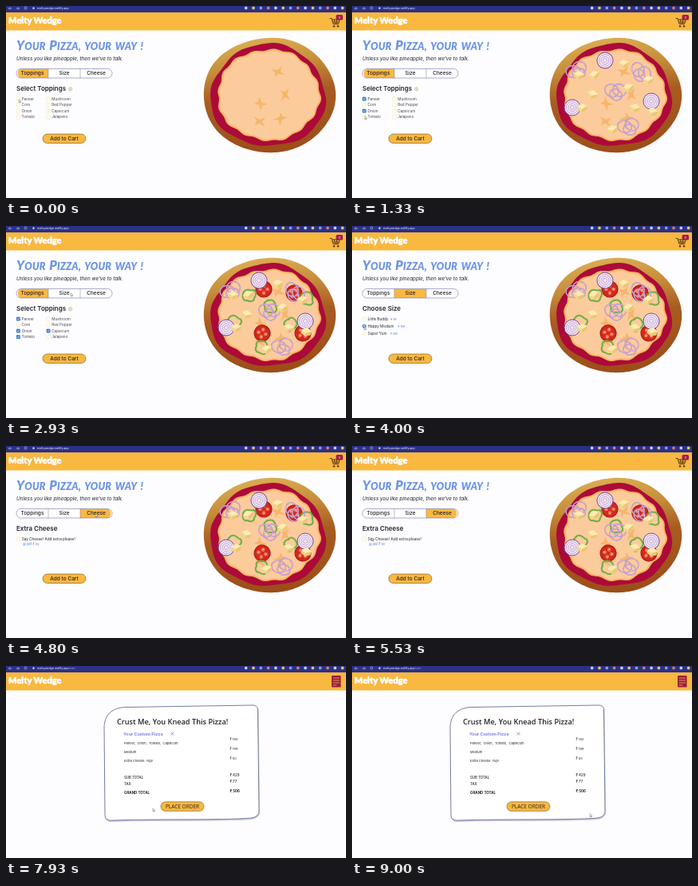
Animation, 426 px wide and 240 px high, one loop 9.07 s. Source, as an HTML page:

```html
<!DOCTYPE html>
<html lang="en">
<head>
<meta charset="utf-8">
<title>Pizza builder</title>
<style>
  html, body { margin: 0; width: 100%; height: 100%; overflow: hidden; background: #fdfdff; }
  svg { display: block; width: 100%; height: 100%; }
  text { font-family: Inter, "Open Sans", sans-serif; fill: #25232b; white-space: pre; }
  .brand { font: 900 11px Lato, sans-serif; fill: #fff; stroke: #fff; stroke-width: .5; stroke-linejoin: round; }
  .hero { font: italic 900 12.5px Lato, sans-serif; fill: #6c94e8; word-spacing: 2px; letter-spacing: .15px; }
  .hero .cap { font-size: 16px; }
  .open { font-family: "Open Sans", "Noto Sans", sans-serif; }
</style>
</head>
<body>
<svg id="stage" viewBox="0 0 426 240" preserveAspectRatio="none"></svg>
<script>
const LOOP = 9070;
const GOLD = '#f9b840', INK = '#34303c', BLUE = '#2f7de0', LILAC = '#a678c4', RIM = '#7478ab';

const text = (x, y, size, str, { w = 400, fill = '#25232b', more = '' } = {}) =>
  `<text x="${x}" y="${y}" font-size="${size}" font-weight="${w}" style="fill:${fill}" ${more}>${str}</text>`;
const path = (d, fill, stroke = 'none', w = 1) =>
  `<path d="${d}" fill="${fill}" stroke="${stroke}" stroke-width="${w}" stroke-linejoin="round" stroke-linecap="round"/>`;
const circle = (x, y, r, fill, stroke = 'none', w = 1) =>
  `<circle cx="${x}" cy="${y}" r="${r}" fill="${fill}" stroke="${stroke}" stroke-width="${w}"/>`;
const rect = (x, y, w, h, fill, more = '') =>
  `<rect x="${x}" y="${y}" width="${w}" height="${h}" fill="${fill}" ${more}/>`;
const group = (id, body) => `<g id="${id}">${body}</g>`;
const place = (spots, draw) => spots.map(([x, y, a = 0]) =>
  `<g transform="translate(${x} ${y}) rotate(${a})">${draw}</g>`).join('');

// Closed outline: an ellipse whose radius is modulated by f(angle).
function blob(cx, cy, rx, ry, f) {
  const pts = [];
  for (let i = 0; i < 180; i++) {
    const a = i * Math.PI / 90, k = 1 + f(a);
    pts.push((cx + rx * k * Math.cos(a)).toFixed(1) + ' ' + (cy + ry * k * Math.sin(a)).toFixed(1));
  }
  return 'M' + pts.join('L') + 'Z';
}

function browserBar() {
  let s = rect(0, 0, 426, 8, '#2b3186');
  s += path('M7 3H3.5l1.4-1.4M3.5 3l1.4 1.4M13 3h3.5l-1.4-1.4M16.5 3l-1.4 1.4', 'none', '#d5d8f5', .6);
  s += circle(24.5, 2.5, 1.5, 'none', '#d5d8f5', .6) + rect(33.5, 1.5, 2, 2.4, '#d5d8f5');
  for (let i = 0; i < 14; i++) {
    const tint = ['#c9cdf0', '#e27a62', '#8f9ae0', '#e7c565'][i * 7 % 4];
    s += rect(299 + i * 9.3, .7, 3.4, 3.6, tint, 'rx="1"');
  }
  return s + text(39, 3.9, 3.6, 'meltywedge.netlify.app<tspan id="route" fill="#9ea5df">/cart</tspan>', { fill: '#eef' });
}

function header() {
  const basket = path('M406 15.5h2l2 7h6.5l1.7-5.5h-9.4M410 20h7M411.5 17l1 5M414.5 17v5', 'none', '#5a3617', 1)
    + circle(411, 25.3, 1.2, '#5a3617') + circle(416, 25.3, 1.2, '#5a3617')
    + rect(413.5, 11, 8.5, 6.5, '#a31c48', 'rx="1.5"') + text(417.8, 15.7, 4, '0', { fill: '#fff', more: 'text-anchor="middle"' });
  const bill = rect(408, 12, 11.5, 14.5, '#981d3e', 'rx="1"')
    + path('M410 15h7.5M410 18h7.5M410 21h7.5M410 24h4', 'none', '#f0ad52', .8);
  return rect(0, 8, 426, 22.5, GOLD) + '<text class="brand" x="3" y="22">Melty Wedge</text>'
    + group('basket', basket) + group('bill', bill);
}

function pizza() {
  const crust = blob(330, 111.5, 83, 72, a => .006 * Math.cos(5 * a) - .006 * Math.cos(2 * a + .6) ** 2);
  const sauce = blob(328.5, 112, 72, 64, a => .025 * Math.sin(3 * a - .2) + .014 * Math.sin(8 * a));
  const cheese = blob(329, 111, 63, 56, a => .018 * Math.sin(16 * a) + .018 * Math.sin(5 * a + 1));
  const flakes = place([[341, 82], [319, 122, 60], [350, 111, 100], [318, 144, 20], [344, 141, 150]],
    path('M-9-3L-1-2 5-7 3 0 9 4 0 3-4 7-4 1Z', '#f5b66c'));

  const ring = (x, y, rx, ry) => [[LILAC, 1.5], ['#f0dcea', .6]].map(([c, w]) =>
    `<ellipse cx="${x}" cy="${y}" rx="${rx}" ry="${ry}" fill="none" stroke="${c}" stroke-width="${w}"/>`).join('');
  const rings = ring(-4, 2, 9, 7.5) + ring(4, -3, 8.5, 7.5) + ring(3, 4, 8, 6.5);
  const disc = circle(0, 0, 10, '#f3e7f5', '#7a4796', 1) + [7.5, 5, 2.5].map(r => circle(0, 0, r, 'none', '#b99aca', .8)).join('');
  const cube = path('M-6-1L0-5 7-2 6 3 0 6-6 3Z', '#f3d68c') + path('M-6-1L0-5 7-2 0 2Z', '#fcebb4')
    + path('M0 2L7-2 6 3 0 6Z', '#eac678');
  const seeds = [0, 90, 180, 270].map(a =>
    `<ellipse cx="4.5" rx="2.5" ry="2.3" fill="#f0704c" transform="rotate(${a})"/>` +
    `<circle cx="5" r=".8" fill="#fad391" transform="rotate(${a})"/>`).join('');
  const slice = circle(0, 0, 10, '#d3281f', '#a9171d', 1.2) + seeds;
  const pepper = path('M-7-5C-3-10 2-5 5-7 10-5 8 0 6 3 6 8 0 8-2 6-8 8-10 1-7-5Z', 'none', '#6fae45', 2)
    + path('M-6-4C-3-8 2-4 4-5', 'none', '#b5da80', .7);

  return path(crust, 'url(#crust)') + path(sauce, '#ac0a39') + path(cheese, '#fccb9c', '#fbb45f', 2) + flakes
    + group('tomato', place([[323, 79], [361, 84, 30], [321, 134, 15], [372, 134, 50]], slice))
    + group('capsicum', place([[305, 87], [331, 101, 70], [286, 120, 30], [356, 123, 140], [320, 152, 90], [377, 91, 80]], pepper))
    + group('onion', place([[317, 68, 10], [276, 127], [375, 119]], disc)
      + place([[281, 80], [362, 82, 60], [330, 106, 30], [346, 150, 15]], rings))
    + group('paneer', place([[340, 72], [284, 86, 10], [303, 86, -15], [371, 92], [301, 110, 20], [346, 102, -10],
      [288, 127], [376, 132, 12], [326, 154, -8], [354, 127, 15]], cube));
}

const heading = str => text(13, 106.3, 8, str, { w: 600 });
const tick = (id, x, y, round) => rect(x, y, 4.6, 4.6, '#fffdf6', `rx="${round ? 2.3 : .8}" stroke="#f4dca2" stroke-width=".5"`)
  + group(id, rect(x, y, 4.8, 4.8, BLUE, `rx="${round ? 2.4 : .8}"`) + (round
    ? circle(x + 2.4, y + 2.4, 1, '#fff')
    : path(`M${x + 1.1} ${y + 2.4}l1 1 1.7-2`, 'none', '#fff', .7)));

function toppings() {
  const names = ['Paneer', 'Corn', 'Onion', 'Tomato', 'Mushroom', 'Red Pepper', 'Capsicum', 'Jalapeno'];
  return heading('Select Toppings') + circle(80.7, 103.8, 2.1, 'none', '#a4a15a', .6)
    + path('M80.7 103.5v1.3M80.7 102.6v.1', 'none', '#a4a15a', .6)
    + names.map((name, i) => {
      const x = i < 4 ? 13 : 50.7, y = 113.7 + i % 4 * 7.5;
      return tick('box' + name.replace(' ', ''), x, y) + text(x + 6.5, y + 4, 4.7, name, { fill: '#4a4650' });
    }).join('');
}

function sizes() {
  const rows = [['Little Buddy', 99, 48.5], ['Happy Medium', 199, 57.5], ['Super Yum', 299, 48]];
  return heading('Choose Size') + rows.map(([name, cost, x], i) => {
    const y = 113.7 + i * 9.2;
    return tick('size' + i, 13, y, true) + text(19.7, y + 4, 4.6, name) + text(x, y + 4, 3.5, '₹ ' + cost, { fill: '#4f7fe0' });
  }).join('');
}

const cheese = () => heading('Extra Cheese') + tick('boxCheese', 13, 113.7)
  + text(19.7, 117.6, 4.65, 'Say Cheese! Add extra please!') + text(21, 123.8, 3.9, '@ just ₹ 50', { fill: '#4f7fe0' });

const button = (x, y, label, cls = '') => rect(x, y, 54, 11.5, GOLD, 'rx="5.7" stroke="#6b552b" stroke-width=".6"')
  + text(x + 27, y + 8, 6.5, label, { w: 500, more: `text-anchor="middle" class="${cls}"` });

function builder() {
  const tabs = ['Toppings', 'Size', 'Cheese'];
  const fills = ['M53 78.5H19a6 6 0 0 0 0 11.5h34Z', 'M53 78.5h40V90H53Z', 'M93 78.5h34a6 6 0 0 1 0 11.5H93Z'];
  return `<text class="hero" x="13" y="55"><tspan class="cap">Y</tspan>OUR <tspan class="cap">P</tspan>IZZA, YOUR WAY !</text>`
    + text(13, 67.7, 6.3, 'Unless you like pineapple, then we\'ve to talk.', { more: 'font-style="italic"' })
    + rect(13, 78.5, 120, 11.5, '#fff', 'rx="5.7"')
    + fills.map((d, i) => group('tab' + i, path(d, GOLD))).join('')
    + rect(13, 78.5, 120, 11.5, 'none', `rx="5.7" stroke="${RIM}" stroke-width=".6"`)
    + path('M53 78.5V90M93 78.5V90', 'none', RIM, .5)
    + tabs.map((name, i) => text(33 + i * 40, 86.4, 6.5, name, { w: 500, more: 'text-anchor="middle"' })).join('')
    + group('panel0', toppings()) + group('panel1', sizes()) + group('panel2', cheese())
    + button(46, 160, 'Add to Cart') + pizza();
}

function cart() {
  const edge = 'M123 77C123 61 133 52 150 51.5L309 49Q315 49 315.5 54L317 180Q318 188 308 190C270 193 190 191 132 193Q124 193 124 187Z';
  const line = (label, cost, y, py, size, w) => text(148, y, size, label, { w })
    + text(280.5, py, size, '₹ ' + cost, { w });
  return `<g transform="translate(.5 1.5)">${path(edge, '#cfcfda', '#cfcfda')}</g>` + path(edge, '#fff', '#535b92', .8)
    + text(139, 72.5, 9.2, 'Crust Me, You Knead This Pizza!', { w: 600, more: 'class="open"' })
    + text(147, 87.3, 5.4, 'Your Custom Pizza', { w: 700, fill: '#7c83e6' })
    + path('M207 83.2l3 3m0-3l-3 3', 'none', '#6369a5', .7)
    + line('Paneer,  Onion,  Tomato,  Capsicum', 180, 98, 93.2, 4, 400)
    + line('Medium', 199, 109, 105, 4, 400)
    + line('Extra Cheese: Yup!', 50, 120, 117, 4, 400)
    + line('SUB TOTAL', 429, 140.5, 138, 4.4, 500)
    + line('TAX', 77, 148.5, 146, 4.4, 500)
    + line('GRAND TOTAL', 506, 160.3, 158, 4.5, 700)
    + button(194, 169.8, 'PLACE ORDER', 'open');
}

const stage = document.getElementById('stage');
stage.innerHTML = `<defs><linearGradient id="crust" x1=".4" y1="0" x2=".55" y2="1">
  <stop offset="0" stop-color="#dcae52"/><stop offset=".25" stop-color="#c68d3a"/><stop offset=".5" stop-color="#a85c22"/><stop offset="1" stop-color="#9c4c18"/>
  </linearGradient></defs>` + rect(0, 0, 426, 240, '#fdfdff') + browserBar() + header()
  + group('builder', builder()) + group('cart', cart())
  + group('pointer', path('M0 0V3.6L.9 2.8 1.6 4.2 2.2 3.9 1.6 2.6H2.7Z', '#fff', INK, .35));

const part = {};
stage.querySelectorAll('[id]').forEach(el => part[el.id] = el);
const show = (id, on) => part[id].setAttribute('display', on ? 'inline' : 'none');

// Times of the clicks, in ms.
const at = { paneer: 270, onion: 930, tomato: 1470, capsicum: 2270, size: 3130, medium: 3670, cheese: 4730, extra: 5730, order: 6470 };
// Pointer stops: time, x, y.
const stops = [[0, 16, 117], [330, 16, 117], [800, 16, 131], [1000, 16, 131], [1300, 16, 138], [1600, 16, 138],
  [2130, 53, 131], [2400, 53, 131], [2900, 81, 84], [3200, 78, 85], [3600, 15, 126], [4070, 15, 126],
  [4600, 112, 85], [4800, 112, 85], [5500, 25, 115], [5700, 16, 116], [5900, 16, 116], [6350, 80, 168],
  [6600, 81, 170], [6930, 81, 172], [7400, 81, 172], [8500, 298, 185], [LOOP, 298, 185]];

function pointerAt(t) {
  const i = Math.max(1, stops.findIndex(s => s[0] >= t));
  const [t0, x0, y0] = stops[i - 1], [t1, x1, y1] = stops[i];
  const u = (t - t0) / (t1 - t0), k = u * u * (3 - 2 * u);
  return [x0 + (x1 - x0) * k, y0 + (y1 - y0) * k];
}

function draw(t) {
  const ordered = t >= at.order;
  const tab = t >= at.cheese ? 2 : t >= at.size ? 1 : 0;
  for (const id of ['builder', 'basket']) show(id, !ordered);
  for (const id of ['cart', 'bill', 'route']) show(id, ordered);
  for (let i = 0; i < 3; i++) {
    show('tab' + i, tab === i);
    show('panel' + i, tab === i);
    show('size' + i, i === 1 && t >= at.medium);
  }
  for (const name of ['Paneer', 'Onion', 'Tomato', 'Capsicum']) {
    const key = name.toLowerCase();
    show(key, t >= at[key]);
    show('box' + name, t >= at[key]);
  }
  for (const name of ['Corn', 'Mushroom', 'RedPepper', 'Jalapeno']) show('box' + name, false);
  show('boxCheese', t >= at.extra);
  part.pointer.setAttribute('transform', `translate(${pointerAt(t).map(v => v.toFixed(2)).join(' ')})`);
}

const start = performance.now();
function loop() {
  draw((performance.now() - start) % LOOP);
  requestAnimationFrame(loop);
}
loop();
</script>
</body>
</html>
```
